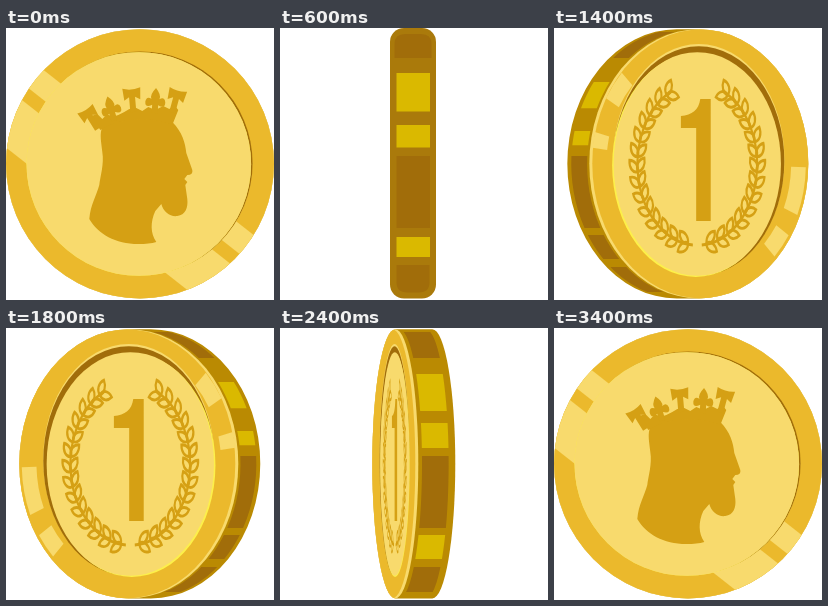
Write an HTML page that moves like this. It is 268 px wide and 272 px high and loops after 3600 ms.

```html
<!DOCTYPE html>
<html lang="en">
<head>
<meta charset="utf-8">
<title>Spinning coin</title>
<style>
html, body { margin: 0; width: 100%; height: 100%; overflow: hidden; background: #fff; }
svg { display: block; width: 100vw; height: 100vh; }
</style>
</head>
<body>
<svg viewBox="0 0 268 272">
  <defs>
    <clipPath id="bodyClip"><path id="bodyShape"/></clipPath>
    <clipPath id="faceClip"><ellipse id="faceShape" cy="135.8" ry="134.6"/></clipPath>
  </defs>
  <g id="turned">
    <path id="body" fill="#ba8a02"/>
    <g id="panels" clip-path="url(#bodyClip)"></g>
    <ellipse id="lip" cy="135.8" ry="134.6" fill="#f8da6d"/>
    <g clip-path="url(#faceClip)">
      <ellipse id="rim" cy="135.8" ry="134.6" fill="#ebb92c"/>
      <g id="bands"></g>
    </g>
    <g id="disc">
      <ellipse id="halo" fill="#f8da6d"/>
      <ellipse id="shade" fill="#a16d0a"/>
      <ellipse id="glow" rx="112.3" ry="111.8" fill="#fdf04a"/>
      <ellipse rx="112.3" ry="111.8" fill="#f8da6d"/>
      <g id="one">
        <path fill="#d5a014" transform="translate(1 0)" d="M3 -65H17V57H-2.500V-36H-23V-48C-8 -49 1 -54 3 -65Z"/>
        <g id="wreath" fill="none" stroke="#d5a014" stroke-width="2.900"></g>
      </g>
      <g id="king" fill="#d5a014" transform="translate(-132.500 -136)">
        <path d="M96 99C93 106 95 114 96 124C98 136 94 148 93 157C90 168 84 177 83 191C92 206 109 216 132 216Q143 216 150 214C144 205 144 194 149 183L155 176C157 184 164 189 171 188C179 187 182 180 181 171L179 157L181 154L178 151L181 147Q187 147 186 142L180 125C179 115 176 104 166 94L130 84Z"/>
        <path d="M94 102L85 88L91 86L96 91L101 86L106 89L112 87L118 84L123 81L130 80L136 83L142 79L149 82L157 78L163 81L168 77L172 82L166 97Q127 83 94 102Z"/>
        <g id="crown"></g>
      </g>
    </g>
  </g>
  <g id="edge">
    <rect x="110" y="0" width="46" height="270.500" rx="14" fill="#aa7a0b"/>
    <path fill="#a16d0a" d="M114.500 30V16Q114.500 6 125 6H141Q151.500 6 151.500 16V30Z"/>
    <path fill="#a16d0a" d="M116.500 237H149.500V254Q149.500 264.500 139 264.500H127Q116.500 264.500 116.500 254Z"/>
    <path fill="#a16d0a" d="M116.500 128H150V200H116.500Z"/>
    <path fill="#dab900" d="M116.500 45H150V83.500H116.500ZM116.500 97H150V119.500H116.500ZM116.500 209H150V229H116.500Z"/>
  </g>
</svg>
<script>
const STEP = 200, CX = 133.8, CY = 135.8, R = 134.6;
const DARK = '#a16d0a', YELLOW = '#dab900', LIGHT = '#f8da6d';
const $ = id => document.getElementById(id);
const set = (el, attrs) => { for (const k in attrs) el.setAttribute(k, attrs[k]); };
const show = (id, on) => { $(id).style.display = on ? '' : 'none'; };

// face offset, face half width, disc squeeze, disc offset, trim of bright panels
const POSES = {
  flat: [0, 134, 1, -1.2, 0],
  A: [11, 109.5, 0.745, 9.5, 8],
  B: [14.5, 87, 0.59, 13, 5],
  C: [16, 61.5, 0.4, 15, 2],
  D: [18.5, 23, 0.13, 19, 0]
};

// pose, motif, side the face has moved to
const TURN = [
  ['flat', 'king', 1], ['B', 'king', -1], ['C', 'king', -1], ['edge'],
  ['D', 'one', 1], ['C', 'one', 1], ['B', 'one', 1], ['A', 'one', 1],
  ['flat', 'one', 1],
  ['A', 'one', -1], ['B', 'one', -1], ['C', 'one', -1], ['D', 'one', -1],
  ['edge'], ['D', 'king', 1], ['C', 'king', 1], ['A', 'king', 1], ['flat', 'king', 1]
];

const PANELS = [[4, 30], [46, 83], [95, 120], [128, 200], [207, 231], [239, 264]];
const GLINTS = [[210, 224], [187, 194], [1.5, 23], [33, 45]];

function buildWreath() {
  const leaf = 'M0 0C3 -6 11 -6 16 0C11 5 4 5 0 0Z';
  let branch = '<path d="M-6 81A81 81 0 0 1 -34 -73"/>';
  for (let i = 0; i < 14; i++) {
    const deg = 99 + i * 10.8, a = deg * Math.PI / 180;
    const x = 80 * Math.cos(a), y = 80 * Math.sin(a);
    for (const tilt of [50, 128])
      branch += `<path d="${leaf}" transform="translate(${x} ${y}) rotate(${deg + tilt})"/>`;
  }
  $('wreath').innerHTML = `<g>${branch}</g><g transform="scale(-1 1)">${branch}</g>`;
}

function buildCrown() {
  const cross = 'M-3 12L-3 -3L-8 0L-9 -12Q0 -9 9 -12L8 0L3 -3L3 12Z';
  const lily = 'M-3 11L-3 3Q-10 7 -10 0Q-9 -6 -4 -3Q-6 -7 0 -14Q6 -7 4 -3Q9 -6 10 0Q10 7 3 3L3 11Z';
  const tips = [[85, 91, -32, cross], [105, 82, -16, lily], [126, 72, -5, cross],
    [149, 74, 3, lily], [169, 73, 15, cross]];
  $('crown').innerHTML = tips.map(([x, y, turn, d]) =>
    `<path d="${d}" transform="translate(${x} ${y}) rotate(${turn})"/>`).join('');
}

function panelPath(y0, y1, side, off, half) {
  const points = [];
  const add = (y, depth) => {
    const k = Math.sqrt(Math.max(0, 1 - ((y - CY) / R) ** 2));
    const x = CX + side * (off * (1 - 2 * depth) - half * k);
    points.push(x.toFixed(2) + ' ' + y.toFixed(2));
  };
  for (let i = 0; i <= 8; i++) add(y0 + (y1 - y0) * i / 8, 0.1);
  for (let i = 8; i >= 0; i--) add(y0 + (y1 - y0) * i / 8, 0.82);
  return 'M' + points.join('L') + 'Z';
}

// light stripes crossing the face, given by their heights on the axis
function stripes(slope, ranges) {
  const d = 140 * slope;
  return ranges.map(([a, b]) =>
    `<path fill="${LIGHT}" d="M-140 ${a - d}L140 ${a + d}V${b + d}L-140 ${b - d}Z"/>`).join('');
}

function glint([from, to]) {
  const at = (r, deg) => r * Math.cos(deg * Math.PI / 180) + ' ' + r * Math.sin(deg * Math.PI / 180);
  return `<path fill="${LIGHT}" d="M${at(113, from)}L${at(131, from)}` +
    `A131 131 0 0 1 ${at(131, to)}L${at(113, to)}A113 113 0 0 0 ${at(113, from)}Z"/>`;
}

function drawTurned(name, motif, side) {
  const [off, half, squeeze, discOff, trim] = POSES[name];
  const flat = name === 'flat';
  const depth = flat ? 0 : 1;
  const mid = flat ? 134 : CX;
  const faceX = mid + side * off;
  const top = CY - R, bottom = CY + R;
  const outline = `M${mid - off} ${top}H${mid + off}A${half} ${R} 0 0 1 ${mid + off} ${bottom}` +
    `H${mid - off}A${half} ${R} 0 0 1 ${mid - off} ${top}Z`;
  $('body').setAttribute('d', outline);
  $('bodyShape').setAttribute('d', outline);

  $('panels').innerHTML = flat ? '' : PANELS.map(([y0, y1], i) => {
    const bright = i === 1 || i === 2 || (i === 4 && name === 'D');
    const cut = bright ? trim : 0;
    return `<path fill="${bright ? YELLOW : DARK}" d="${panelPath(y0 + cut, y1 - cut / 3, side, off, half)}"/>`;
  }).join('');

  for (const id of ['lip', 'faceShape']) set($(id), { cx: faceX, rx: half });
  set($('rim'), { cx: faceX + side * 3 * depth, rx: half });
  $('bands').setAttribute('transform',
    `translate(${faceX} ${CY}) scale(${side * half / 134} 1)`);
  $('bands').innerHTML = name === 'D' ? '' :
    flat ? stripes(0.785, [[-18, 12], [29, 89]]) : GLINTS.map(glint).join('');

  $('disc').setAttribute('transform',
    `translate(${mid + side * discOff} 136) scale(${squeeze} 1)`);
  const shift = side * (1.5 + 0.5 * depth);
  set($('halo'), { cx: shift, cy: -4.5 * depth, rx: 112 + 3 * depth, ry: 111 + 4.5 * depth });
  set($('shade'), { cx: shift, cy: -0.8 - 2.2 * depth, rx: 112.3 + 2.5 * depth, ry: 111.8 + 3 * depth });
  set($('glow'), { cx: -shift * depth, cy: 1.2 * depth });
  show('one', motif === 'one');
  show('king', motif === 'king');
}

let last = -1;
function render(time) {
  const i = Math.floor(time / STEP) % TURN.length;
  if (i !== last) {
    last = i;
    const [name, motif, side] = TURN[i];
    show('edge', name === 'edge');
    show('turned', name !== 'edge');
    if (name !== 'edge') drawTurned(name, motif, side);
  }
}

buildWreath();
buildCrown();
render(0);
let start;
function tick(now) {
  if (start === undefined) start = now;
  render(now - start);
  requestAnimationFrame(tick);
}
requestAnimationFrame(tick);
</script>
</body>
</html>
```
